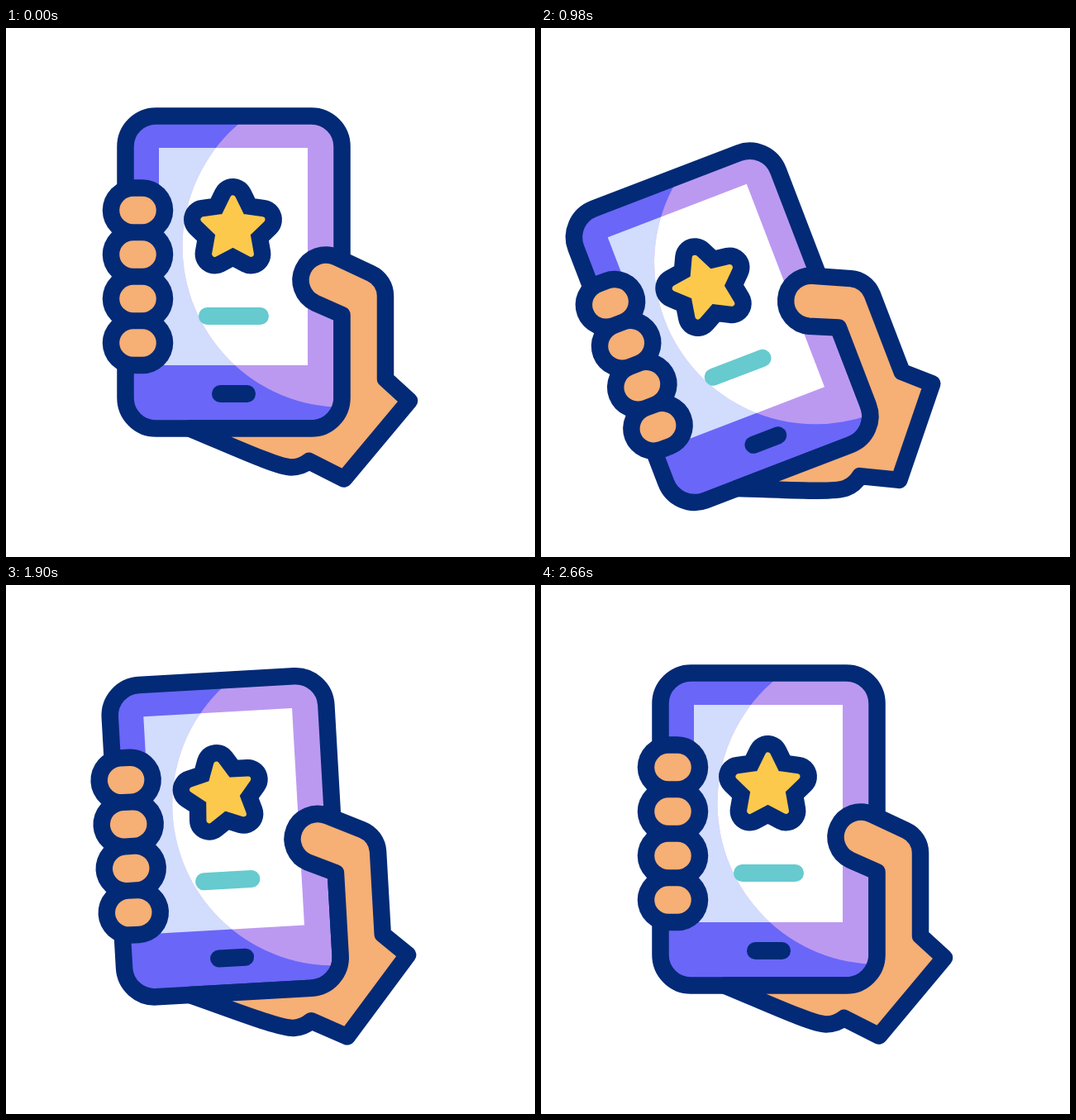
An HTML page with a canvas for the animation above (2820 ms loop, 640x640 px).

```html
<!DOCTYPE html>
<html lang="en">
<head>
<meta charset="utf-8">
<title>Phone shake</title>
<style>
  html, body { margin: 0; width: 100%; height: 100%; overflow: hidden; background: #fff; }
  canvas { display: block; width: 640px; height: 640px; }
</style>
</head>
<body>
<canvas id="stage" width="640" height="640"></canvas>
<script>
const ctx = document.getElementById('stage').getContext('2d');
const LOOP = 2820;
const RAD = Math.PI / 180;
const LINE = 20.5;
const PIVOT = { x: 425, y: 480.5 };
const NAVY = '#032a76', VIOLET = '#6a66f8', LILAC = '#bb99f1', PALE = '#d2dcfc';
const SKIN = '#f6af74', TEAL = '#66cacf', YELLOW = '#fdc94c';

// Swing extremes after the first pull: [time, degrees]
const SWING = [[977, -21], [1607, 16], [1996, -6.4], [2310, 3.2], [2660, 0]];

const progress = (t, from, to) => Math.min(1, Math.max(0, (t - from) / (to - from)));
const sineInOut = u => (1 - Math.cos(Math.PI * u)) / 2;
const quadOut = u => 1 - (1 - u) ** 2;

function tilt(t) {
  if (t < 200) return 0;
  if (t < SWING[0][0]) return -21 * (1 - Math.exp(-(t - 200) * 0.0062));
  for (let i = 1; i < SWING.length; i++) {
    const [t0, a0] = SWING[i - 1], [t1, a1] = SWING[i];
    if (t < t1) return a0 + (a1 - a0) * sineInOut(progress(t, t0, t1));
  }
  return 0;
}

// Shrinks to nothing, waits, then grows back
function regrow(t, shrinkFrom, shrinkTo, growFrom, growTo) {
  return t < growFrom
    ? 1 - sineInOut(progress(t, shrinkFrom, shrinkTo))
    : quadOut(progress(t, growFrom, growTo));
}

function stroke(color, width) {
  ctx.strokeStyle = color;
  ctx.lineWidth = width;
  ctx.stroke();
}

function pill(cx, cy, half, width, color) {
  ctx.beginPath();
  ctx.moveTo(cx - half - 0.01, cy);
  ctx.lineTo(cx + half + 0.01, cy);
  stroke(color, width);
}

function rect(x, y, w, h, color) {
  ctx.fillStyle = color;
  ctx.fillRect(x, y, w, h);
}

function bodyPath() {
  ctx.beginPath();
  ctx.roundRect(144.5, 106.5, 262, 378, 37);
}

function drawPhone() {
  ctx.save();
  bodyPath();
  ctx.clip();
  rect(134, 96, 283, 399, VIOLET);
  rect(185, 145, 180, 263, PALE);
  ctx.beginPath();
  ctx.arc(408.5, 264, 195, 0, 2 * Math.PI);
  ctx.clip();
  rect(134, 96, 283, 399, LILAC);
  rect(185, 145, 180, 263, '#fff');
  ctx.restore();
  bodyPath();
  stroke(NAVY, LINE);
  pill(275.5, 442.5, 16, 21, NAVY);
}

function drawStar(size, turn) {
  ctx.save();
  ctx.translate(274.5, 243.3);
  ctx.rotate(turn * RAD);
  ctx.beginPath();
  for (let i = 0; i < 10; i++) {
    const r = Math.max(size, 0.001) * (i % 2 ? 18.5 : 37.3);
    const a = (i * 36 - 90) * RAD;
    ctx.lineTo(r * Math.cos(a), r * Math.sin(a));
  }
  ctx.closePath();
  stroke(NAVY, 41 + 7 * size);
  if (size > 0.01) {
    ctx.fillStyle = YELLOW;
    ctx.fill();
    stroke(YELLOW, 7 * size);
  }
  ctx.restore();
}

function drawHand() {
  ctx.beginPath();
  ctx.arc(387, 305, 30.5, 115.5 * RAD, 295.5 * RAD);
  ctx.arcTo(459, 305, 459, 425, 30);
  ctx.lineTo(459, 424.5);
  ctx.lineTo(488, 451);
  ctx.lineTo(409, 545.5);
  ctx.lineTo(366.5, 524);
  ctx.quadraticCurveTo(357, 531.5, 345, 531.5);
  ctx.bezierCurveTo(329, 531.5, 274, 506, 222, 484.5);
  ctx.lineTo(369.5, 484.5);
  ctx.arcTo(406.5, 484.5, 406.5, 447.5, 37);
  ctx.lineTo(406.5, 347);
  ctx.closePath();
  ctx.fillStyle = SKIN;
  ctx.fill();
  stroke(NAVY, LINE);
}

function drawFingers() {
  const rows = [0, 1, 2, 3].map(i => 220.5 + i * 53.5);
  rows.forEach(y => pill(159.5, y, 5.5, 74.5, NAVY));
  rows.forEach(y => pill(159.5, y, 5.5, 33.5, SKIN));
}

function draw(t) {
  rect(0, 0, 640, 640, '#fff');
  ctx.save();
  ctx.translate(PIVOT.x, PIVOT.y);
  ctx.rotate(tilt(t) * RAD);
  ctx.translate(-PIVOT.x, -PIVOT.y);
  ctx.lineCap = ctx.lineJoin = 'round';

  drawPhone();
  const star = regrow(t, 980, 1190, 1190, 2060);
  drawStar(star, -225 * (1 - star));
  pill(275.5, 348.5, 32 * regrow(t, 1000, 1400, 1540, 2070), 21, TEAL);
  drawHand();
  drawFingers();
  ctx.restore();
}

const start = performance.now();
function frame() {
  draw((performance.now() - start) % LOOP);
  requestAnimationFrame(frame);
}
frame();
</script>
</body>
</html>
```
